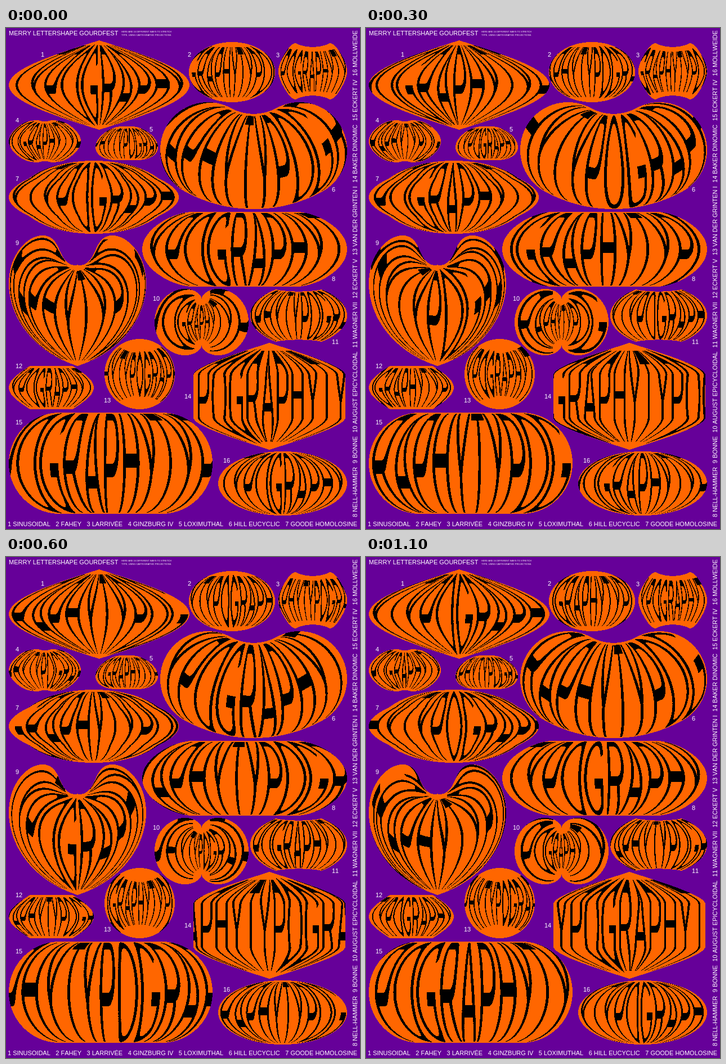
An HTML page with a canvas for the animation above (1200 ms loop, 629 px wide and 891 px high).

```html
<!DOCTYPE html>
<html lang="en">
<head>
<meta charset="utf-8">
<title>Typographic pumpkins</title>
<style>
  html, body { margin: 0; width: 629px; height: 891px; overflow: hidden; background: #609; }
  body { position: relative; color: #fff; font: 11px/12px "Liberation Sans", Arial, Helvetica, sans-serif; font-kerning: none; white-space: nowrap; }
  canvas { position: absolute; left: 0; top: 0; }
  .title, .note, .row, .num { position: absolute; }
  .title { left: 5px; top: 3px; }
  .note { left: 205px; top: 4px; font-size: 4px; line-height: 6px; }
  .row { display: flex; justify-content: space-between; }
  #bottom { left: 3px; top: 876px; width: 621px; }
  #side { left: 614px; top: 870px; width: 866px; transform: rotate(-90deg); transform-origin: 0 0; }
</style>
</head>
<body>
<canvas id="stage" width="629" height="891"></canvas>
<div class="title">MERRY LETTERSHAPE GOURDFEST</div>
<div class="note">HERE ARE 16 DIFFERENT WAYS TO STRETCH<br>TYPE, USING CARTOGRAPHIC PROJECTIONS.</div>
<div class="row" id="bottom"></div>
<div class="row" id="side"></div>
<script>
const start = performance.now();
const { PI, abs, sin, cos, tan, asin, atan2, sqrt, log, sign, min, max, floor, ceil } = Math;
const HALF = PI / 2, RAD = PI / 180;
const root = v => sqrt(max(0, v));

// Root of a rising function by bisection.
function solve(f, lo, hi) {
  for (let i = 0; i < 40; i++) {
    const mid = (lo + hi) / 2;
    if (f(mid) < 0) lo = mid; else hi = mid;
  }
  return (lo + hi) / 2;
}

// Projections: (longitude, latitude) in radians -> [x, y], y upwards.
const sinusoidal = (l, p) => [l * cos(p), p];

function fahey(l, p) {
  const t = tan(p / 2), k = cos(35 * RAD);
  return [l * k * root(1 - t * t), (1 + k) * t];
}

const larrivee = (l, p) => [l * (1 + root(cos(p))) / 2, p / (cos(p / 2) * cos(l / 6))];

function ginzburg4(l, p) {
  if (abs(p) < 1e-9) return [2.8284 * l / PI, 0];
  const q = p * p;
  const x = 2.8284 + q * (-1.6988 + q * (0.75432 - q * 0.18071));
  const y = p * (0.76003 + q * (-0.38914 + q * 0.042555));
  const m = (x * x + y * y) / (2 * y), a = l * asin(x / m) / PI;
  return [m * sin(a), p + m * (1 - cos(a))];
}

function loximuthal(l, p) {
  const p0 = 40 * RAD, y = p - p0;
  if (abs(y) < 1e-6) return [l * cos(p0), y];
  if (HALF - abs(p) < 1e-6) return [0, y];
  return [l * y / log(tan(PI / 4 + p / 2) / tan(PI / 4 + p0 / 2)), y];
}

function hillEucyclic(l, p) {
  const K = 1, L = 1 + K, b = 1 / L, B = PI + 4 * b * L, A = 2 * sqrt(PI / B);
  const angle = t => b + atan2(sin(t), L - cos(t));
  const dist = t => 1 + L * L - 2 * L * cos(t);
  const t = solve(t => t - K * K * b - L * sin(t) + dist(t) * angle(t) - (1 - sin(p)) * B / 2, 0, PI);
  const r = A * sqrt(dist(t)), w = l * angle(t) / PI;
  return [r * sin(w), -r * cos(w)];
}

function mollweide(l, p) {
  const t = solve(t => 2 * t + sin(2 * t) - PI * sin(p), -HALF, HALF);
  return [2 * sqrt(2) / PI * l * cos(t), sqrt(2) * sin(t)];
}

function homolosine(l, p) {
  if (abs(p) < 0.710988) return sinusoidal(l, p);
  const [x, y] = mollweide(l, p);
  return [x, y - sign(p) * 0.0528035];
}

const nellHammer = (l, p) => [l * (1 + cos(p)) / 2, 2 * (p - tan(p / 2))];

function bonne(l, p) {
  const r = 1 + PI / 4 - p, e = l * cos(p) / r;
  return [r * sin(e), -r * cos(e)];
}

function august(l, p) {
  const t = tan(p / 2), k = root(1 - t * t), c = 1 + k * cos(l / 2);
  const x = sin(l / 2) * k / c, y = t / c;
  return [x * (3 + x * x - 3 * y * y), y * (3 + 3 * x * x - y * y)];
}

function wagner7(l, p) {
  const s = 0.90631 * sin(p), c = sqrt(1 - s * s), d = sqrt(2 / (1 + c * cos(l / 3)));
  return [2.66723 * c * d * sin(l / 3), 1.24104 * s * d];
}

const eckert5 = (l, p) => [l * (1 + cos(p)), 2 * p];

function vanDerGrinten(l, p) {
  if (abs(p) < 1e-9) return [l, 0];
  const s = min(1, abs(p) / HALF), c = sqrt(1 - s * s);
  if (abs(l) < 1e-9 || s > 1 - 1e-9) return [0, sign(p) * PI * tan(asin(s) / 2)];
  const A = abs(PI / l - l / PI) / 2, G = c / (s + c - 1), P = G * (2 / s - 1);
  const D = P * P + A * A, E = G - P * P, Q = A * A + G;
  return [
    sign(l) * PI * (A * E + root(A * A * E * E - D * (G * G - P * P))) / D,
    sign(p) * PI * (P * Q - A * root((A * A + 1) * D - Q * Q)) / D
  ];
}

function baker(l, p) {
  const a = abs(p), k = 2 * sqrt(2);
  if (a < PI / 4) return [l, log(tan(PI / 4 + p / 2))];
  return [l * cos(a) * (k - 1 / sin(a)), sign(p) * (k * (a - PI / 4) - log(tan(a / 2)))];
}

function eckert4(l, p) {
  const t = solve(t => t + sin(t) * cos(t) + 2 * sin(t) - (2 + HALF) * sin(p), -HALF, HALF);
  return [l * (1 + cos(t)), PI * sin(t)];
}

// Name, projection, box (left, top, right, bottom), longitude at the middle, number position.
const pumpkins = [
  ["SINUSOIDAL", sinusoidal, [5, 22, 326, 181], 180, [62, 51]],
  ["FAHEY", fahey, [325, 25, 478, 132], 330, [323, 51]],
  ["LARRIVÉE", larrivee, [484, 27, 606, 127], 240, [480, 52]],
  ["GINZBURG IV", ginzburg4, [5, 164, 133, 239], 270, [17, 168]],
  ["LOXIMUTHAL", loximuthal, [159, 175, 270, 235], 90, [255, 184]],
  ["HILL EUCYCLIC", hillEucyclic, [274, 132, 606, 322], 30, [579, 291]],
  ["GOODE HOMOLOSINE", homolosine, [5, 236, 307, 366], 150, [17, 272]],
  ["NELL-HAMMER", nellHammer, [242, 327, 606, 460], 210, [579, 450]],
  ["BONNE", bonne, [5, 369, 249, 601], 0, [17, 386]],
  ["AUGUST EPICYCLOIDAL", august, [264, 464, 431, 582], 270, [261, 485]],
  ["WAGNER VII", wagner7, [434, 465, 606, 558], 60, [579, 562]],
  ["ECKERT V", eckert5, [5, 601, 156, 678], 210, [17, 605]],
  ["VAN DER GRINTEN I", vanDerGrinten, [175, 553, 300, 678], 120, [174, 666]],
  ["BAKER DINOMIC", baker, [333, 560, 603, 750], 240, [317, 659]],
  ["ECKERT IV", eckert4, [5, 684, 367, 864], 270, [17, 705]],
  ["MOLLWEIDE", mollweide, [377, 753, 606, 867], 180, [386, 773]]
];

function addText(parent, text, cls) {
  const el = document.createElement("div");
  el.className = cls || "";
  el.textContent = text;
  parent.append(el);
  return el;
}

pumpkins.forEach(([name, , , , [x, y]], i) => {
  addText(i < 7 ? bottom : side, `${i + 1} ${name}`);
  const num = addText(document.body, i + 1, "num");
  num.style.left = x + "px";
  num.style.top = y - 10 + "px";
});

// One word stretched around the whole globe, as a mask over longitude and latitude.
const DEG = 4, TW = 360 * DEG, TH = 180 * DEG;
function makeTexture() {
  const c = document.createElement("canvas");
  c.width = TW;
  c.height = TH;
  const g = c.getContext("2d"), word = "TYPOGRAPHY", capLat = 80;
  g.font = '200px "Liberation Sans", Arial, sans-serif';
  g.fontKerning = "none";
  const sx = TW / g.measureText(word).width;
  const sy = 2 * capLat * DEG / g.measureText("H").actualBoundingBoxAscent;
  g.setTransform(sx, 0, 0, sy, 0, (90 + capLat) * DEG);
  g.fillText(word, 0, 0);
  const data = g.getImageData(0, 0, TW, TH).data;
  return Uint8Array.from({ length: TW * TH }, (_, i) => data[i * 4 + 3] > 127 ? 1 : 0);
}

const W = 629, H = 891, N = 120;
const cols = new Int16Array(W * H).fill(-1), rows = new Int16Array(W * H);

// Fills a triangle of [x, y, longitude, latitude] points with texture places.
function fillTriangle(a, b, c) {
  const area = (b[0] - a[0]) * (c[1] - a[1]) - (c[0] - a[0]) * (b[1] - a[1]);
  if (abs(area) < 1e-7) return;
  const x0 = ceil(min(a[0], b[0], c[0]) - 0.5), x1 = floor(max(a[0], b[0], c[0]) - 0.5);
  const y0 = ceil(min(a[1], b[1], c[1]) - 0.5), y1 = floor(max(a[1], b[1], c[1]) - 0.5);
  for (let y = y0; y <= y1; y++) for (let x = x0; x <= x1; x++) {
    const px = x + 0.5 - a[0], py = y + 0.5 - a[1];
    const v = (px * (c[1] - a[1]) - (c[0] - a[0]) * py) / area;
    const w = ((b[0] - a[0]) * py - px * (b[1] - a[1])) / area;
    if (v < -1e-6 || w < -1e-6 || v + w > 1 + 1e-6) continue;
    const lon = a[2] + v * (b[2] - a[2]) + w * (c[2] - a[2]);
    const lat = a[3] + v * (b[3] - a[3]) + w * (c[3] - a[3]);
    const i = y * W + x;
    cols[i] = ((floor(lon * DEG) % TW) + TW) % TW;
    rows[i] = max(0, min(TH - 1, floor((90 - lat) * DEG)));
  }
}

function mapPumpkin([, project, [left, top, right, bot], middle]) {
  const pts = [];
  let minX = Infinity, maxX = -Infinity, minY = Infinity, maxY = -Infinity;
  for (let j = 0; j <= N; j++) for (let i = 0; i <= N; i++) {
    const l = PI * (2 * i / N - 1), p = HALF * sin(PI * (j / N - 0.5)); // denser at the poles
    const [x, y] = project(l, p);
    minX = min(minX, x); maxX = max(maxX, x);
    minY = min(minY, y); maxY = max(maxY, y);
    pts.push([x, y, l / RAD + middle, p / RAD]);
  }
  for (const q of pts) {
    q[0] = left + (q[0] - minX) / (maxX - minX) * (right - left);
    q[1] = top + (maxY - q[1]) / (maxY - minY) * (bot - top);
  }
  for (let j = 0; j < N; j++) for (let i = 0; i < N; i++) {
    const k = j * (N + 1) + i;
    fillTriangle(pts[k], pts[k + 1], pts[k + N + 1]);
    fillTriangle(pts[k + 1], pts[k + N + 2], pts[k + N + 1]);
  }
}

const texture = makeTexture();
pumpkins.forEach(mapPumpkin);

const ctx = document.getElementById("stage").getContext("2d");
const image = ctx.createImageData(W, H);
const pixels = new Uint32Array(image.data.buffer);
const ORANGE = 0xff0066ff, BLACK = 0xff000000; // ABGR

// The globe turns 30 degrees each 100 ms.
const STEP = 100, STEPS = 12;
let shown = -1;
function draw(step) {
  const shift = step * TW / STEPS;
  for (let i = 0; i < pixels.length; i++) {
    if (cols[i] < 0) continue;
    pixels[i] = texture[rows[i] * TW + (cols[i] + shift) % TW] ? BLACK : ORANGE;
  }
  ctx.putImageData(image, 0, 0);
}

function tick() {
  const step = floor((performance.now() - start) / STEP) % STEPS;
  if (step !== shown) draw(shown = step);
  requestAnimationFrame(tick);
}
tick();
</script>
</body>
</html>
```
